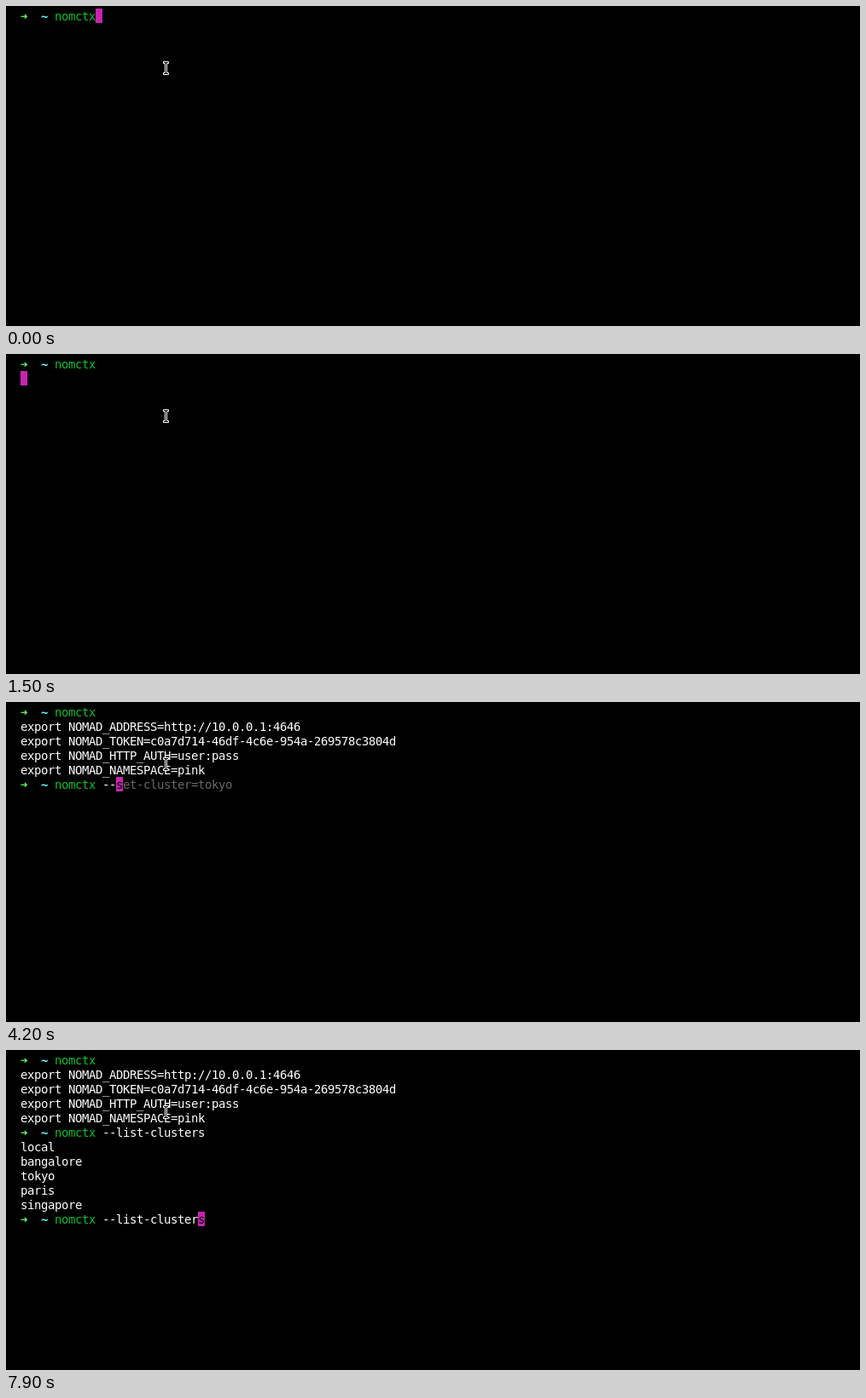
Recreate the animation shown at these times as an HTML page. Size 1001 px wide and 376 px high, loop 8000 ms.

```html
<!DOCTYPE html>
<html lang="en">
<head>
<meta charset="utf-8">
<title>Terminal session</title>
<style>
html, body { margin: 0; width: 100%; height: 100%; overflow: hidden; background: #000; }
#screen, #mouse { position: absolute; left: 0; top: 0; width: 1001px; height: 376px; overflow: hidden; }
#screen {
  font: 14px/18px "DejaVu Sans Mono", monospace;
  letter-spacing: calc(8px - 1ch);
  font-kerning: none;
  font-variant-ligatures: none;
  color: #fff;
}
#screen span { position: absolute; height: 17px; white-space: pre; }
.arrow { color: #5ffa68; font-weight: bold; }
.path { color: #60fdff; font-weight: bold; }
.command { color: #0fbd2c; }
.unknown { color: #ff7060; font-weight: bold; }
.ghost { color: #686868; }
#screen .cursor { width: 8px; background: #c724b1; color: #000; }
.bar { background: #303030; }
.pointer { color: #d7005f; font-weight: bold; }
.selected { color: #e4e4e4; font-weight: bold; }
.count { color: #afaf87; }
.query { color: #87afd7; font-weight: bold; }
#mouse path { fill: #000; stroke: #fff; stroke-width: 1; }
</style>
</head>
<body>
<div id="screen"></div>
<svg id="mouse" viewBox="0 0 1001 376">
  <path id="beam" d="M184.5 65.5H190.5V67.5H188.5V78.5H190.5V80.5H184.5V78.5H186.5V67.5H184.5Z"/>
  <path id="arrow" d="M187.5 72.5V88.5L191 85L193.5 90.5L196 89.3L193.6 84H198.5Z"/>
</svg>
<script>
const CELL = 8, ROW = 17, LEFT = 17, TOP = 3, LOOP = 8000;
const screen = document.getElementById('screen');
const beam = document.getElementById('beam');
const arrow = document.getElementById('arrow');
const clusters = ['local', 'bangalore', 'tokyo', 'paris', 'singapore'];
const exportsShown = [
  'ADDRESS=http://10.0.0.1:4646',
  'TOKEN=c0a7d714-46df-4c6e-954a-269578c3804d',
  'HTTP_AUTH=user:pass',
  'NAMESPACE=pink'
];
const listing = '--list-clusters';

function put(row, col, text, style = '') {
  const span = document.createElement('span');
  span.className = style;
  span.textContent = text;
  span.style.left = LEFT + col * CELL + 'px';
  span.style.top = TOP + row * ROW + 'px';
  screen.append(span);
  return span;
}

function bar(row, cells) {
  put(row, 0, '', 'bar').style.width = cells * CELL + 'px';
}

// Splits the typed line into command and arguments; the cursor covers the next character.
function prompt(row, typed = '', ghost = '', cursor = typed.length) {
  put(row, 0, '➜', 'arrow');
  put(row, 3, '~', 'path');
  const name = typed.slice(0, 6);
  put(row, 5, name, name === 'nomctx' ? 'command' : 'unknown');
  put(row, 11, typed.slice(6));
  put(row, 5 + typed.length, ghost, 'ghost');
  if (cursor !== null) put(row, 5 + cursor, (typed + ghost)[cursor] || ' ', 'cursor');
}

function entered() {
  prompt(0, 'nomctx', '', null);
}

function started() {
  entered();
  put(1, 0, ' ', 'cursor');
}

function picker(selected) {
  clusters.forEach((name, i) => {
    const row = 18 - i, active = i === selected;
    bar(row, active ? name.length + 2 : 1);
    if (active) put(row, 0, '>', 'pointer');
    put(row, 2, name, active ? 'selected' : '');
  });
  put(19, 2, '5/5', 'count');
  put(20, 0, '>', 'query');
  put(20, 2, ' ', 'cursor');
}

function session(...line) {
  entered();
  exportsShown.forEach((text, i) => put(i + 1, 0, 'export NOMAD_' + text));
  prompt(5, ...line);
}

function listed(...line) {
  session('nomctx ' + listing, '', null);
  clusters.forEach((name, i) => put(6 + i, 0, name));
  prompt(11, ...line);
}

const full = 'nomctx ' + listing;
const steps = [
  [0, () => prompt(0, 'nomctx')],
  [500, started],
  [600, () => picker(0)],
  [1000, () => picker(1)],
  [1500, started],
  [1600, () => session()],
  [2200, () => session('n', 'omctx')],
  [2400, () => session('no', 'mctx')],
  [2800, () => session('nomctx')],
  [3300, () => session('nomctx ', '--set-cluster=tokyo')],
  [4000, () => session('nomctx -', '-set-cluster=tokyo')],
  [4200, () => session('nomctx --', 'set-cluster=tokyo')],
  [4900, () => session('nomctx --l', 'ist-clusters')],
  [5100, () => session('nomctx --lis', 't-clusters')],
  [5400, () => session(full)],
  [5700, () => session(full + ' ')],
  [6300, () => session(full)],
  [6600, () => listed()],
  [7600, () => listed(full)],
  [7900, () => listed(full, '', full.length - 1)]
];

let shown = -1;
function tick() {
  const time = performance.now() % LOOP;
  const index = steps.findLastIndex(([start]) => start <= time);
  if (index !== shown) {
    shown = index;
    screen.replaceChildren();
    steps[index][1]();
    const picking = time >= 600 && time < 1500;
    beam.style.display = picking ? 'none' : '';
    arrow.style.display = picking ? '' : 'none';
  }
  requestAnimationFrame(tick);
}
tick();
</script>
</body>
</html>
```
